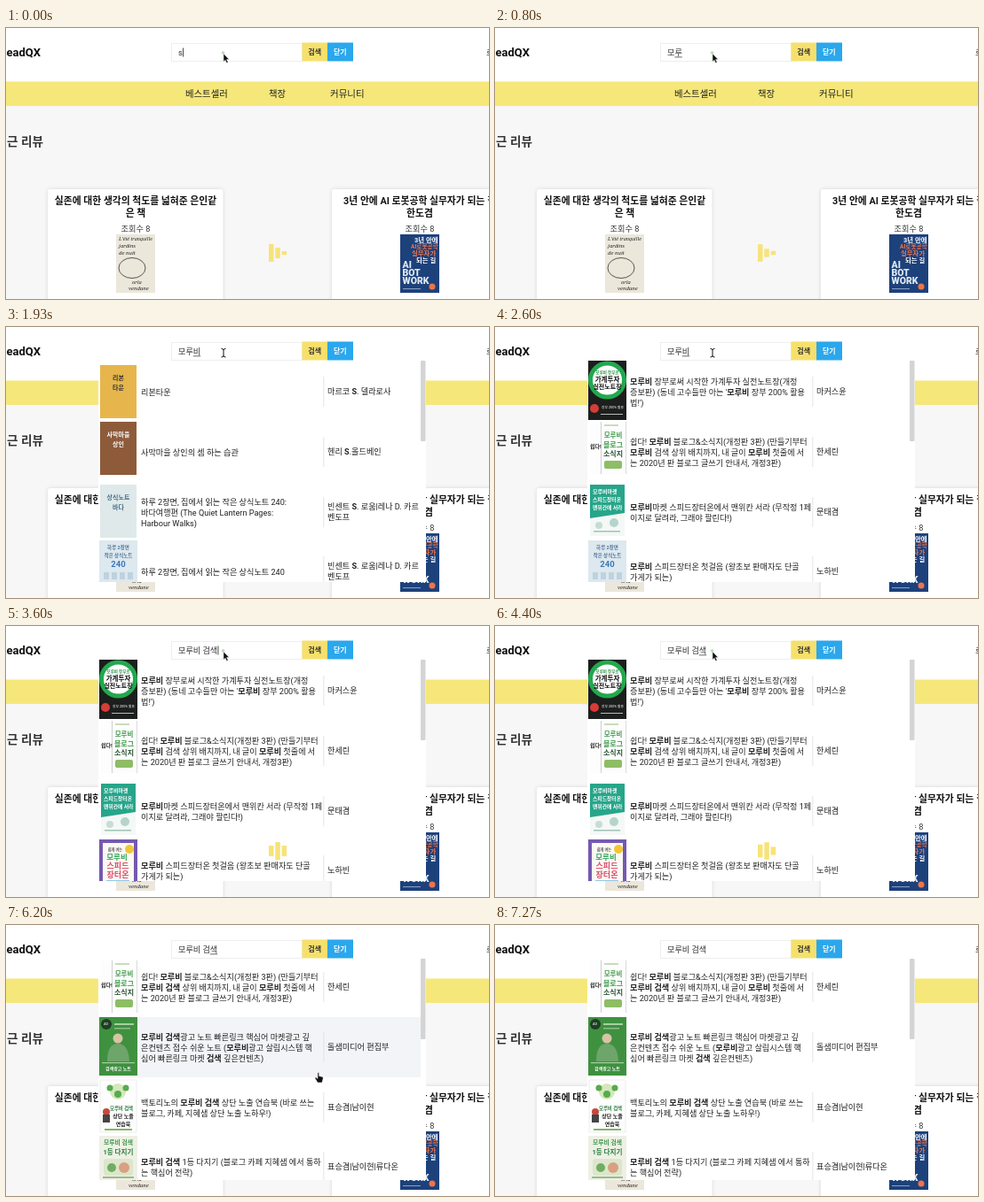
Recreate the animation shown at these times as an HTML page. Size 544x306 px, loop 7.34 s.

```html
<!DOCTYPE html>
<html lang="ko">
<head>
<meta charset="utf-8">
<style>
  html, body { margin: 0; width: 100%; height: 100%; overflow: hidden; background: #fff; }
  svg { display: block; width: 544px; height: 306px; font-family: Roboto, "Noto Sans CJK KR", "Noto Sans CJK", sans-serif; }
  .card { filter: drop-shadow(0 0 2px #0002); }
</style>
</head>
<body>
<svg viewBox="0 0 544 306">
  <g id="page"></g>
  <rect id="panel" x="104" y="38" width="369" fill="#fff"/>
  <rect id="hover" x="104" width="363" height="68" fill="#f3f4f7"/>
  <g id="results"></g>
  <text id="query" x="194" y="31" font-size="9.15" fill="#333"></text>
  <rect id="caret" width=".8" y="22.5" height="10" fill="#222"/>
  <rect id="underline" width="8.4" y="32.5" height=".8" fill="#444"/>
  <g id="loader" fill="#f7e37a"><rect/><rect/><rect/></g>
  <g id="mouse">
    <g id="arrow"><circle cx="-.5" cy="-1" r="1.8" fill="#b5dfb0"/><path d="M0 0v9l2-1.8 1.6 3.3 1.5-.7-1.6-3.2h2.8z" fill="#111" stroke="#fff" stroke-width=".4"/></g>
    <path id="beam" d="M-2.5-4.5q2.5 0 2.5 1.5 0-1.5 2.5-1.5M0-3v7M-2.5 5q2.5 0 2.5-1.5 0 1.5 2.5 1.5" fill="none" stroke="#111"/>
    <path id="hand" d="M-1-5q1-1 1.6 0v3.5l4 1q.8.5.5 2L4 6H-1L-4 1q0-1.5 1.5-.8L-1 1.5z" fill="#111" stroke="#fff" stroke-width=".5"/>
  </g>
</svg>
<script>
const LOOP = 7340, ROW_CENTERS = [70, 138, 206, 273];
const $ = id => document.getElementById(id);

const rect = (x, y, w, h, fill, extra = '') =>
  `<rect x="${x}" y="${y}" width="${w}" height="${h}" fill="${fill}" ${extra}/>`;
const circle = (x, y, r, fill, extra = '') =>
  `<circle cx="${x}" cy="${y}" r="${r}" fill="${fill}" ${extra}/>`;
// y is the middle of the line; *word* is bold
const text = (x, y, s, size = 9.15, fill = '#222', extra = '') =>
  `<text x="${x}" y="${y + size * .36}" font-size="${size}" fill="${fill}" ${extra}>` +
  s.replace(/\*(.+?)\*/g, '<tspan font-weight="700">$1</tspan>') + '</text>';
const MID = 'text-anchor="middle"', BOLD = 'font-weight="700"';
const title = (x, y, s, size, fill) => text(x, y, s, size, fill, `${MID} ${BOLD}`);
const lines = (x, middle, s, gap = 12) => s.split('/').map((line, i, all) =>
  text(x, middle + (i - (all.length - 1) / 2) * gap, line)).join('');

// Book covers, each about 43 x 64
const plain = (bg, ink, ...words) => rect(1, 0, 41, 60, bg) +
  words.map((w, i) => title(21.5, 14 + i * 11, w, 7, ink)).join('');
const covers = {
  town: plain('#e6b64c', '#333', '리본', '타운'),
  desert: plain('#8e5b3a', '#fff', '사막마을', '상인'),
  sea: plain('#dfe9ea', '#47708c', '상식노트', '바다'),
  daily: rect(0, 0, 43, 66, '#dde8ef') + title(21.5, 8, '하루 2장면', 5.5, '#54779a') +
    title(21.5, 17, '작은 상식노트', 5.5, '#54779a') + title(21.5, 27, '240', 9.5, '#3b79b8') +
    [0, 1, 2, 3].map(i => rect(5 + i * 9, 36, 6, 8, '#bed2df')).join(''),
  ledger: rect(0, 0, 43, 67, '#1c1f1d') +
    circle(21.5, 22, 19, '#fff', 'stroke="#22a84e" stroke-width="5"') +
    title(21.5, 13, '모루비 장부로', 4.5, '#28964a') + title(21.5, 21, '가계투자', 7.5, '#111') +
    title(21.5, 29, '실전노트장', 7, '#111') + circle(7, 54, 5, '#d83c36') +
    text(15, 53, '장부 200% 활용', 3.8, '#fff') + rect(14, 60, 25, 1, '#bbb'),
  blog: rect(2, 0, 41, 59, '#fdfdfd') + rect(14, 0, .7, 59, '#bbb') + rect(42, 0, .7, 59, '#ccc') +
    text(2, 28, '쉽다!', 6, '#222', BOLD) + rect(18, 3, 16, 2, '#cbdcb9') +
    title(28, 15, '모루비', 7.5, '#3f9b4c') + title(28, 26, '블로그', 8, '#3f9b4c') +
    title(28, 36, '소식지', 8, '#2a5433') + rect(18, 44, 20, 9, '#8dbd65', 'rx="2"'),
  shop: rect(2, 0, 39, 58, '#f4f8f6') + '<path d="M2 0h39v32l-39 6z" fill="#27a58a"/>' +
    text(5, 8, '모루비마켓', 6, '#fff', BOLD) + text(5, 17, '스피드장터온', 5.8, '#fff', BOLD) +
    text(5, 26, '맨위칸에 서라', 5.8, '#fff', BOLD) +
    circle(12, 46, 4, '#c6ddd5') + circle(29, 43, 5, '#b5d4ca') + rect(6, 52, 30, 1.5, '#9fc4b8'),
  store: rect(0, 0, 43, 62, '#7459b0') + rect(4, 4, 35, 46, '#fbf9f4') +
    circle(34, 11, 5, '#f3c536') + title(18, 11, '쉽게 여는', 4.2, '#555') +
    title(20, 20, '모루비', 8.5, '#36a55b') + title(21, 30, '스피드', 9, '#de4f67') +
    title(21, 40, '장터온', 9, '#de4f67') + rect(8, 46, 26, 3, '#8fc8e9'),
  ads: rect(0, 0, 43, 66, '#3f9140') + circle(8, 8, 6, '#1f3d24') + text(5, 8, 'AD', 4, '#fff') +
    rect(17, 7, 22, 2, '#a5d0a0') + rect(17, 12, 18, 1.5, '#8bc087') +
    circle(21, 24, 5.5, '#d8c4a4') + '<path d="M9 50q0-20 12-20t13 20z" fill="#6ea56a"/>' +
    rect(3, 51, 37, 1.2, '#a5d0a0') + title(21.5, 58, '검색광고 노트', 5, '#fff'),
  practice: rect(1, 0, 41, 59, '#fdfdfd', 'stroke="#ddd" stroke-width=".5"') +
    circle(21, 13, 9, '#d4e8bc') + circle(12, 9, 3.5, '#58ab4a') + circle(30, 9, 3.5, '#58ab4a') +
    circle(21, 16, 4, '#58ab4a') + circle(8, 36, 4, '#c9473c') + rect(4, 39, 8, 9, '#444') +
    title(25, 32, '모루비 검색', 5.4, '#287b3d') + title(27, 41, '상단 노출', 6, '#222') +
    title(27, 50, '연습북', 6, '#222') + rect(6, 55, 31, 2, '#83b865'),
  first: rect(0, 0, 43, 62, '#eef0e5') + title(21.5, 8, '모루비 검색', 6.8, '#3e984d') +
    title(21.5, 18, '1등 다지기', 7.6, '#2c813f') + rect(5, 26, 33, 19, '#dce6cb', 'rx="3"') +
    circle(14, 36, 5, '#70ad62') + circle(28, 36, 6, '#d9a083') + rect(4, 46, 35, 2, '#9abb87'),
};

const daily = '하루 2장면, 집에서 읽는 작은 상식노트 240', pair = '빈센트 *S*. 로움|레나 D. 카르/벤도프';
const compactList = [
  [44, '리본타운', '마르코 *S*. 델라로사'],
  [58, '사막마을 상인의 셈 하는 습관', '헨리 *S*.올드베인'],
  [77.5, daily + ': 바다여행편/(The Quiet Lantern Pages: Harbour Walks)', pair],
  [102, daily, pair],
  [121, '소리 (귀가 밤에게 건네는 말)', 'E. *S*. 모르카'],
  [140.5, daily + ': 동물편 (The/Quiet Lantern Menageries)', pair],
  [159, '포크송 레더 하프교실 2 (기타연주보 포함)', '*S*.몬테라움'],
  [173, '들꽃 기록학 (계절별 시선으로 정원 읽기)', '브레넌 *S*. 톨비'],
  [192, '에드몬드 발레리안 코르스테인 풍경 작품집', '펠릭스 *S*. 하르덴|소피 모르간/하르덴'],
  [217, '이사했더니 등대지기였던 날에 관하여 12 (일본 오리지널 굿즈/한정판) (*S* Paper+)', '나루'],
];
const letterRows = [
  compactList[0].slice(1), compactList[1].slice(1),
  ['하루 2장면, 집에서 읽는 작은 상식노트 240:/바다여행편 (The Quiet Lantern Pages:/Harbour Walks)', pair],
  [daily, pair],
];
const wordRows = [
  ["*모루비* 장부로써 시작한 가계투자 실전노트장(개정/증보판) (동네 고수들만 아는 '*모루비* 장부 200% 활용/법!')", '마커스윤'],
  ['쉽다! *모루비* 블로그&amp;소식지(개정판 3판) (만들기부터/*모루비* 검색 상위 배치까지, 내 글이 *모루비* 첫줄에 서/는 2020년 판 블로그 글쓰기 안내서, 개정3판)', '한세린'],
  ['*모루비*마켓 스피드장터온에서 맨위칸 서라 (무작정 1페/이지로 달려라, 그래야 팔린다!)', '문태겸'],
  ['*모루비* 스피드장터온 첫걸음 (왕초보 판매자도 단골/가게가 되는)', '노하빈'],
];
const phraseRows = [
  [wordRows[1][0].replace('*모루비* 검색', '*모루비 검색*'), '한세린'],
  ['*모루비 검색*광고 노트 빠른링크 핵심어 마켓광고 깊/은컨텐츠 접수 쉬운 노트 (*모루비*광고 살림시스템 핵/심어 빠른링크 마켓 *검색* 깊은컨텐츠)', '돌샘미디어 편집부'],
  ['백토리노의 *모루비 검색* 상단 노출 연습북 (바로 쓰는/블로그, 카페, 지혜샘 상단 노출 노하우!)', '표승겸|남이현'],
  ['*모루비 검색* 1등 다지기 (블로그 카페 지혜샘 에서 통하/는 핵심어 전략)', '표승겸|남이현|류다온'],
];

const compact = () => rect(343, 38, .6, 191, '#eee') + compactList.map(([y, name, author]) =>
  lines(108, y, name, 11.5) + lines(347, y, author, 11.5)).join('') + text(286, 243, '더보기', 9.15, '#222', MID);

const rows = (list, names, shift = 0) => '<svg x="104" y="38" width="369" height="250" viewBox="104 38 369 250">' +
  list.map(([name, author], i) => {
    const y = ROW_CENTERS[i] + shift;
    const top = names[i] === 'ledger' ? 38 : y - [30, 34, 31, 35][i];
    return `<g transform="translate(105 ${top})">${covers[names[i]]}</g>` +
      lines(152, y + .4, name) + rect(357.5, y - 17, .8, 34, '#ddd') + lines(362, y, author);
  }).join('') + rect(467, 38, 5.5, 91, '#d4d4d4', 'rx="1"') + '</svg>';

// [start, panel height, content]
const panels = [
  [0, 0, ''],
  [1330, 217, compact()],
  [1730, 250, rows(letterRows, ['town', 'desert', 'sea', 'daily'], 3)],
  [2600, 250, rows(wordRows, ['ledger', 'blog', 'shop', 'daily'], 3)],
  [2740, 250, rows(wordRows, ['ledger', 'blog', 'shop', 'store'], 3)],
  [4860, 250, rows(phraseRows, ['blog', 'ads', 'shop', 'store'])],
  [5000, 250, rows(phraseRows, ['blog', 'ads', 'practice', 'store'])],
  [5130, 250, rows(phraseRows, ['blog', 'ads', 'practice', 'first'])],
];
const typing = [
  [0, 's'], [280, 'ㅁ'], [420, '모'], [560, '몰'], [700, '모루'], [870, '모룹'], [1050, '모루비'],
  [2670, '모루비 '], [2800, '모루비 ㄱ'], [2940, '모루비 거'], [3070, '모루비 검'],
  [3200, '모루비 검ㅅ'], [3330, '모루비 검새'], [3470, '모루비 검색'],
];
const at = (track, t) => track.findLast(([start]) => start <= t);

const card = (x, heading) => rect(x, 182, 197.5, 140, '#fff', 'rx="3" class="card"') +
  heading.split('/').map((line, i) => title(x + 99, 195 + i * 14.5, line, 10.8, '#111')).join('') +
  text(x + 99, 227, '조회수 8', 9.2, '#333', MID);

$('page').innerHTML =
  rect(0, 88, 544, 218, '#f7f7f8') + rect(0, 60.5, 544, 27.5, '#f6e77a') +
  text(39, 27.5, 'ReadQX', 13, '#111', `${BOLD} text-anchor="end"`) +
  rect(186.5, 17.5, 147, 20, '#fff', 'stroke="#eee"') +
  rect(333.5, 16.5, 28.5, 21, '#f6e06c') + title(347.7, 27.5, '검색', 8.1, '#333') +
  rect(362, 16.5, 29, 21, '#2ba7ec') + title(376.3, 27.5, '닫기', 8, '#fff') +
  text(541, 28, '로그인') +
  text(202, 74, '베스트셀러', 10.4) + text(296, 74, '책장', 10.4) + text(365, 74, '커뮤니티', 10.5) +
  text(42, 128, '최근 리뷰', 13.6, '#333', `${BOLD} text-anchor="end"`) +
  card(47, '실존에 대한 생각의 척도를 넓혀준 은인같/은 책') +
  card(367, '3년 안에 AI 로봇공학 실무자가 되는 길/한도겸') +
  rect(124, 233, 44, 66, '#ece7db') +
  `<g font-family="Liberation Serif, serif" font-style="italic">` +
  text(127, 238, "L'été tranquille", 6.2) + text(127, 246, 'jardins', 6.8) + text(127, 254, 'de nuit', 6.8) +
  text(142, 287, 'orla', 6.5) + text(138, 294, 'vendane', 6.8) + '</g>' +
  '<ellipse cx="142" cy="271" rx="15" ry="11.5" fill="none" stroke="#444" stroke-width=".9"/>' +
  rect(444, 233, 44, 66, '#1d417b') + text(460, 239, '3년 안에', 7.4, '#fff', BOLD) +
  text(456, 247, 'AI로봇공학', 6.6, '#ee744a', BOLD) + text(457, 254.5, '실무자가', 7.4, '#ee744a', BOLD) +
  text(462, 262, '되는 길', 7.4, '#fff', BOLD) +
  ['AI', 'BOT', 'WORK'].map((w, i) => text(446.5, 267.5 + i * 9, w, 10.5, '#dfe9f2', 'font-weight="900"')).join('') +
  circle(480, 292, 3.5, '#ee744a') + rect(447, 294, 20, 1, '#8aa0c4');

const show = (id, on) => $(id).setAttribute('display', on ? 'inline' : 'none');
const set = (el, attrs) => Object.entries(attrs).forEach(([k, v]) => el.setAttribute(k, v));
let current;

function draw(t) {
  const panel = at(panels, t);
  if (panel !== current) {
    current = panel;
    $('panel').setAttribute('height', panel[1]);
    $('results').innerHTML = panel[2];
  }

  const query = $('query');
  query.textContent = at(typing, t)[1];
  const end = 194 + query.getComputedTextLength();
  const caretOn = t < 200 || (t > 2670 && t < 4200);
  show('caret', caretOn);
  show('underline', !caretOn && t < 6700);
  $('caret').setAttribute('x', end + .3);
  $('underline').setAttribute('x', end - 8.4);

  const loading = t < 1330 || (t > 2670 && t < 4860);
  show('loader', loading);
  [...$('loader').children].forEach((bar, i) => {
    const h = 12 + 8 * Math.cos(2 * Math.PI * t / 847 - i * Math.PI / 2);
    set(bar, { x: 296 + i * 7.3, y: 254 - h / 2, width: 5.5, height: h });
  });

  const move = Math.max(0, (t - 5870) / 330);
  const x = (t < 4860 ? 245 : 255) + 97 * move, y = 29 + 143 * move;
  $('mouse').setAttribute('transform', `translate(${x} ${y})`);
  show('mouse', t < 6530);
  show('arrow', loading);
  show('beam', !loading && y < 38);
  show('hand', !loading && y >= 38);
  show('hover', y >= 38 && y < 288 && t < 6530);
  $('hover').setAttribute('y', 36 + 68 * Math.floor((y - 36.5) / 68));
}

let start;
function tick(now) {
  start ??= now;
  draw((now - start) % LOOP);
  requestAnimationFrame(tick);
}
requestAnimationFrame(tick);
</script>
</body>
</html>
```
